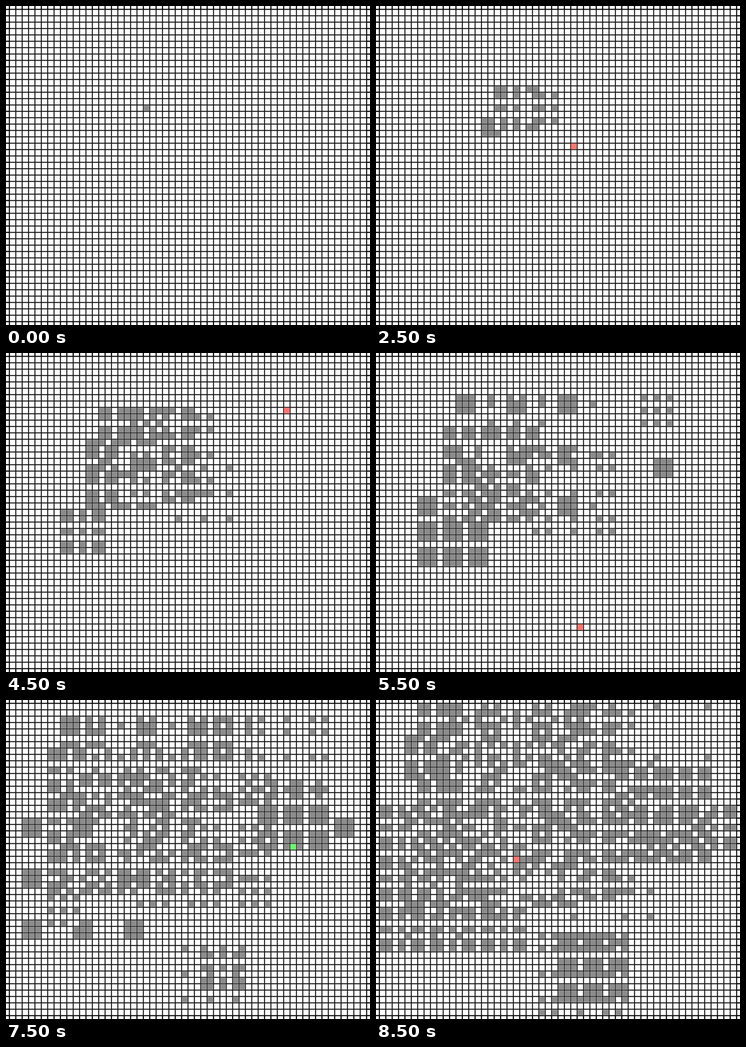
Recreate the animation shown at these times as an HTML page. Size 799 by 701 pixels, loop 10000 ms.

```html
<!DOCTYPE html>
<html lang="en">
<head>
<meta charset="utf-8">
<title>Parity automaton with stray cells</title>
<style>
  html, body { margin: 0; width: 100%; height: 100%; overflow: hidden; background: #fff; }
  svg { display: block; }
</style>
</head>
<body>
<svg width="799" height="701" viewBox="0 0 799 701">
  <path id="lines" stroke="#000" stroke-width="2.5" fill="none"/>
  <path id="blank" fill="#fff" opacity="0.3"/>
  <path id="live" fill="#8c8c8c"/>
  <path id="flip"/>
</svg>
<script>
const COLS = 56, ROWS = 49, PITCH = 14, EDGE = 8;
const LOOP = 10000, HOLD = 1500, STEP = 500;
const BORN = "#f87872", DIED = "#72f274";

// One stray cell [column, row] toggles after each step
const strays = [
  [21, 15], [25, 15], [17, 18], [30, 21], [11, 27], [21, 10], [18, 17], [43, 8],
  [44, 17], [31, 42], [33, 41], [8, 32], [52, 19], [44, 22], null, [21, 24]
];

const el = id => document.getElementById(id);
const square = (c, r) => `M${EDGE + c * PITCH} ${EDGE + r * PITCH}h13v13h-13z`;

function eachCell(visit) {
  for (let r = 0; r < ROWS; r++)
    for (let c = 0; c < COLS; c++) visit(c, r);
}

const emptyGrid = () => Array.from({ length: ROWS }, () => new Uint8Array(COLS));

// A cell lives when its 3 by 3 block holds an odd number of live cells
function advance(grid) {
  const next = emptyGrid();
  eachCell((c, r) => {
    for (let y = r - 1; y <= r + 1; y++)
      for (let x = c - 1; x <= c + 1; x++)
        if (grid[y] && grid[y][x]) next[r][c] ^= 1;
  });
  return next;
}

function buildSteps() {
  let grid = emptyGrid();
  return strays.map((stray, n) => {
    grid = advance(grid);
    const step = { live: "", flip: "", color: BORN };
    if (stray) {
      const [c, r] = stray;
      grid[r][c] ^= 1;
      if (n > 0) {
        step.flip = square(c, r);
        step.color = grid[r][c] ? BORN : DIED;
      }
    }
    eachCell((c, r) => { if (grid[r][c]) step.live += square(c, r); });
    return step;
  });
}

function drawBoard() {
  let lines = "", blank = "";
  for (let c = 0; c <= COLS; c++) lines += `M${7.5 + c * PITCH} 0V701`;
  for (let r = 0; r <= ROWS; r++) lines += `M0 ${7.5 + r * PITCH}H799`;
  eachCell((c, r) => { blank += square(c, r); });
  el("lines").setAttribute("d", lines);
  el("blank").setAttribute("d", blank);
}

const steps = buildSteps();
let shown = -1;

function render(ms) {
  const t = ms % LOOP;
  const n = t < HOLD ? 0 : Math.min(steps.length - 1, 1 + Math.floor((t - HOLD) / STEP));
  if (n === shown) return;
  shown = n;
  el("live").setAttribute("d", steps[n].live);
  el("flip").setAttribute("d", steps[n].flip);
  el("flip").setAttribute("fill", steps[n].color);
}

drawBoard();
render(0);
const start = performance.now();
function tick() {
  render(performance.now() - start);
  requestAnimationFrame(tick);
}
requestAnimationFrame(tick);
</script>
</body>
</html>
```
